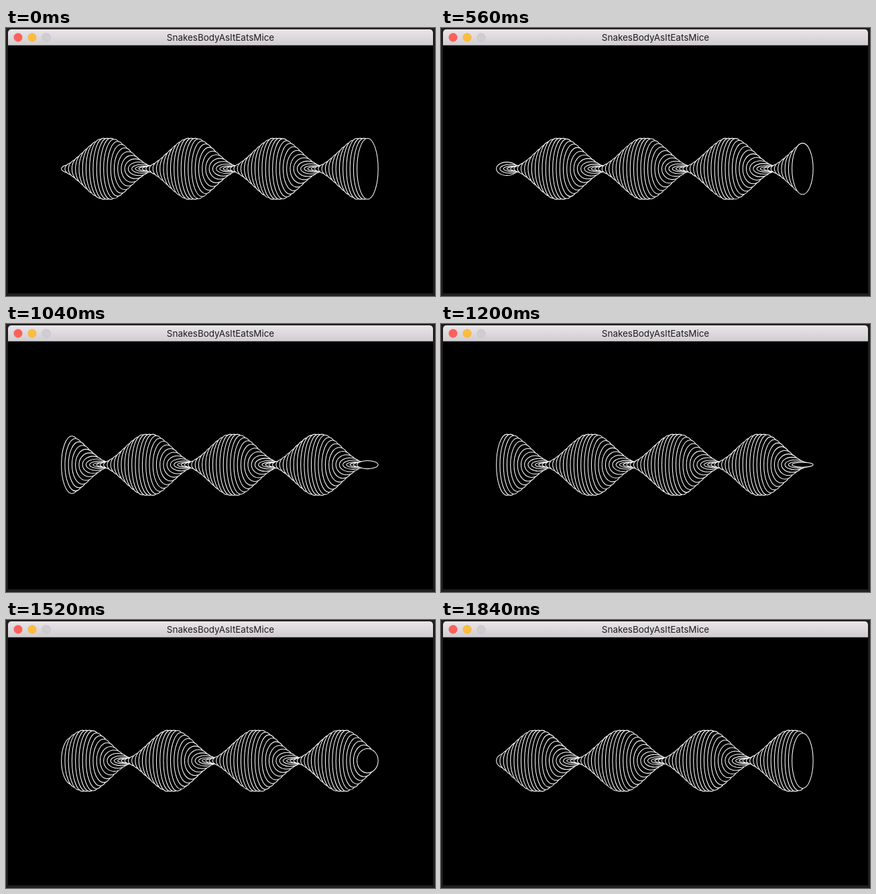
Recreate the animation shown at these times as an HTML page with a canvas. Size 640 by 399 pixels, loop 1920 ms.

```html
<!DOCTYPE html>
<html lang="en">
<head>
<meta charset="utf-8">
<title>SnakesBodyAsItEatsMice</title>
<style>
html, body { margin: 0; width: 100%; height: 100%; overflow: hidden; background: #211e1f; }
canvas { position: absolute; left: 0; top: 0; width: 640px; height: 399px; }
h1 {
  position: absolute; left: 0; top: 2px; width: 640px; height: 24px; margin: 0;
  font: 400 13.45px/24px Inter, Roboto, sans-serif;
  color: #1f1d1f; text-align: center; white-space: nowrap;
}
</style>
</head>
<body>
<canvas width="640" height="399"></canvas>
<h1>SnakesBodyAsItEatsMice</h1>
<script>
const ctx = document.querySelector('canvas').getContext('2d');

const RINGS = 85, GAP = 5.25, WAVE = 126.8;
const FIRST_X = 98.4, MID_Y = 209.6, RX = 15.75;
const LAST_X = FIRST_X + (RINGS - 1) * GAP;
const STEP_MS = 80, STEPS = 24;

function dot(x, fill, edge) {
  ctx.beginPath();
  ctx.arc(x, 14, 6.2, 0, 2 * Math.PI);
  ctx.fillStyle = fill;
  ctx.fill();
  ctx.lineWidth = 0.6;
  ctx.strokeStyle = edge;
  ctx.stroke();
}

function drawWindow() {
  ctx.fillStyle = '#211e1f';
  ctx.fillRect(0, 0, 640, 399);
  ctx.fillStyle = '#000';
  ctx.fillRect(3, 25, 634, 370);

  const bar = ctx.createLinearGradient(0, 2, 0, 26);
  bar.addColorStop(0, '#e9e5e9');
  bar.addColorStop(1, '#d0cdd0');
  ctx.fillStyle = bar;
  ctx.beginPath();
  ctx.moveTo(3, 25.75);
  ctx.arcTo(3, 2, 8, 2, 5);
  ctx.arcTo(637, 2, 637, 7, 5);
  ctx.lineTo(637, 25.75);
  ctx.fill();

  dot(18, '#fc605b', '#f0605a');
  dot(39, '#fdbc40', '#eeb344');
  dot(60, '#d0cdd0', '#bfbcbf');
}

// The wave creeps at the start of the loop, then runs at a steady pace.
function shiftAt(step) {
  return step < 3 ? -8 + 1.2 * step : -4.4 + 5.8 * (step - 3);
}

function drawSnake(shift) {
  ctx.fillStyle = '#000';
  ctx.strokeStyle = '#fff';
  ctx.lineWidth = 1.05;
  for (let i = 0; i < RINGS; i++) {
    const x = FIRST_X + i * GAP;
    const angle = 2 * Math.PI * (x - LAST_X - shift) / WAVE;
    const height = Math.min(91, 50.5 + 43.5 * Math.cos(angle));
    ctx.beginPath();
    ctx.ellipse(x, MID_Y, RX, height / 2, 0, 0, 2 * Math.PI);
    ctx.fill();
    ctx.stroke();
  }
}

const start = performance.now();
let shown = -1;

function tick() {
  const step = Math.floor((performance.now() - start) / STEP_MS) % STEPS;
  if (step !== shown) {
    shown = step;
    drawWindow();
    drawSnake(shiftAt(step));
  }
  requestAnimationFrame(tick);
}
tick();
</script>
</body>
</html>
```
